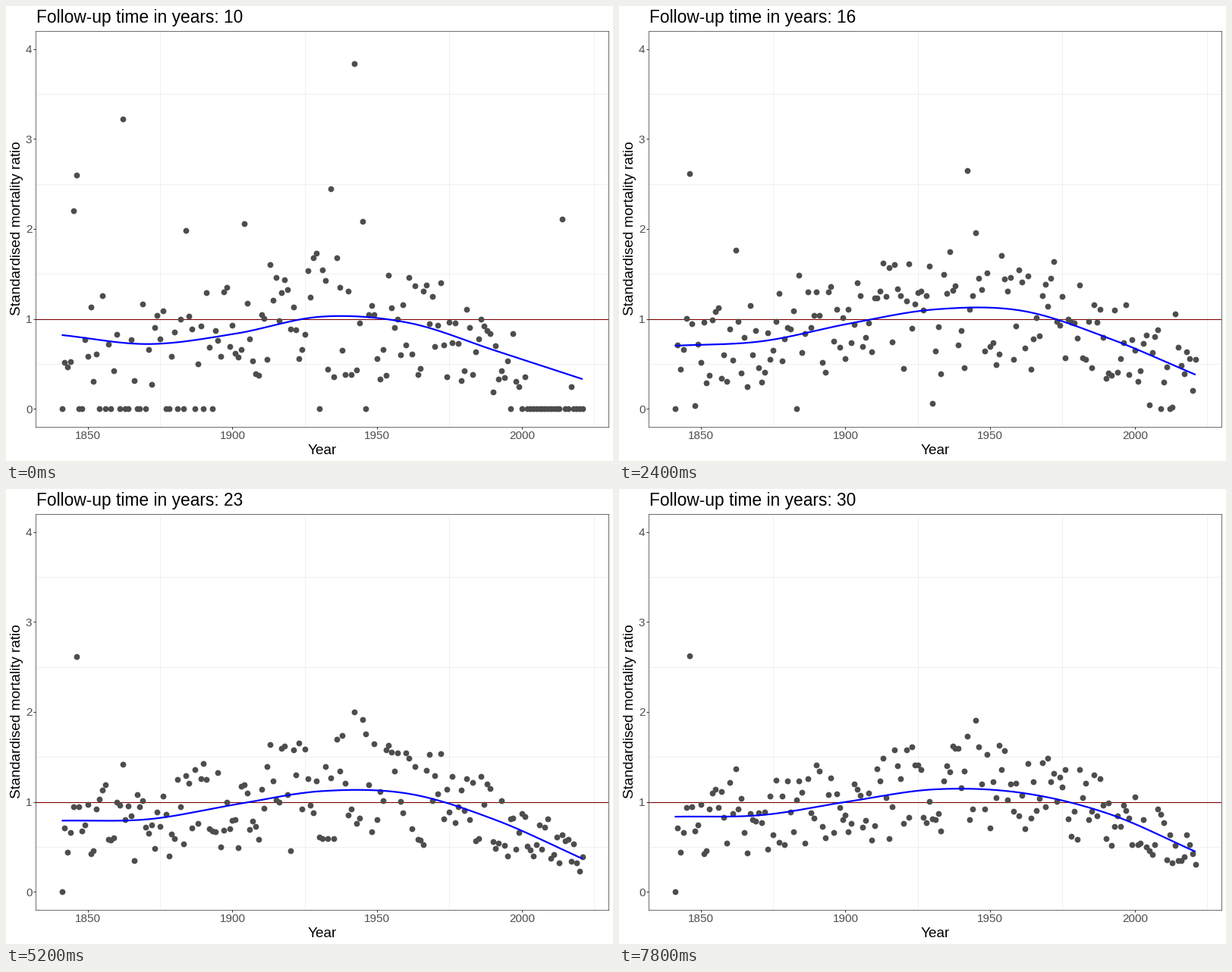
A matplotlib script for the animation above (8000 ms loop, 800 px wide and 600 px high).

```python
import numpy as np
import matplotlib.pyplot as plt
from matplotlib.animation import FuncAnimation

W, H, DPI = 800, 600, 100
PX = 72 / DPI                      # points per pixel
FRAMES, STEP = 40, 200
LEFT, RIGHT, TOP, BOTTOM = 39.2, 794.2, 32.9, 554.9
X0, X1, Y0, Y1 = 1832, 2030, -0.2, 4.2
GREY, DARK, PALE = "#4d4d4d", "#333333", "#ebebeb"

plt.rcParams["font.family"] = "Liberation Sans"

years = np.arange(1841, 2022)
follow = np.arange(10, 31)         # follow-up time, whole years

# Trend height every 30 years from 1841, keyed by follow-up time
TREND = {
    10: [.82, .72, .835, 1.025, .955, .645, .33],
    14: [.69, .715, .905, 1.115, 1.04, .75, .44],
    16: [.70, .75, .945, 1.105, 1.09, .785, .38],
    20: [.77, .785, .955, 1.11, 1.085, .765, .33],
    30: [.837, .855, 1.005, 1.14, 1.10, .87, .45],
}

# Points that stand out: year, first height, final height, years to settle
PEAKS = [
    (1845, 2.20, .94, 2), (1846, 2.60, 2.62, 5), (1862, 3.22, 1.35, 4),
    (1884, 1.98, 1.20, 6), (1904, 2.06, 1.12, 5), (1934, 2.45, 1.22, 4),
    (1942, 3.84, 1.50, 8.5), (1945, 2.08, 1.90, 5), (2014, 2.11, .45, 6),
]


def time_at(i):
    return 10 + 50 * i / 99


def smooth(keys):
    """Catmull-Rom curve through evenly spaced keys, sampled at each year."""
    p = np.array([2 * keys[0] - keys[1], *keys, 2 * keys[-1] - keys[-2]])
    u = (years - 1841) / 30
    k = np.minimum(u.astype(int), len(keys) - 2)
    f = u - k
    a, b, c, d = p[k], p[k + 1], p[k + 2], p[k + 3]
    return b + f / 2 * (c - a + f * (2 * a - 5 * b + 4 * c - d
                                     + f * (3 * (b - c) + d - a)))


def mix(rows, times, t):
    """Linear blend of the two rows that lie either side of time t."""
    k = int(np.clip(np.searchsorted(times, t, side="right") - 1, 0, len(times) - 2))
    f = (t - times[k]) / (times[k + 1] - times[k])
    return rows[k] * (1 - f) + rows[k + 1] * f


trend_times = list(TREND)
curves = [smooth(keys) for keys in TREND.values()]


def build_ratios():
    """Ratio for each follow-up time (rows) and calendar year (columns)."""
    rng = np.random.default_rng(1841)
    n, rho = len(years), 0.93
    z = rng.standard_normal(n)

    # Some years have no deaths at first, mostly early and late ones
    chance = np.interp(years, [1841, 1897, 1905, 1980, 2000, 2004],
                       [.3, .3, .02, .02, .2, .8])
    release = np.where(rng.random(n) < chance, 10.1 + rng.exponential(4.5, n), 0)

    out = []
    for t in follow:
        spread = np.interp(t, [10, 30], [.76, .5])
        ratio = mix(curves, trend_times, t) * (1 + spread * np.tanh(.75 * z))
        out.append(np.where(t < release, 0, ratio))
        z = rho * z + np.sqrt(1 - rho ** 2) * rng.standard_normal(n)
    out = np.array(out)

    for j in range(15):            # the earliest groups settle for good
        out[j + 1:, j] = out[j + 1, j]
    for year, start, end, settle in PEAKS:
        out[:, year - 1841] = end + (start - end) * np.exp((10 - follow) / settle)
    return out


ratios = build_ratios()

fig = plt.figure(figsize=(W / DPI, H / DPI), dpi=DPI, facecolor="white")
ax = fig.add_axes([LEFT / W, 1 - BOTTOM / H, (RIGHT - LEFT) / W, (BOTTOM - TOP) / H])
ax.set(xlim=(X0, X1), ylim=(Y0, Y1))
ax.set_xticks(range(1850, 2001, 50))
ax.set_yticks(range(5))
ax.tick_params(length=2.75 * PX, width=1.07 * PX, color=DARK,
               labelbottom=False, labelleft=False)
for side in ax.spines.values():
    side.set(color=DARK, linewidth=0.7 * PX)


def label(x, y, text, size, color="black", **kw):
    return fig.text(x / W, 1 - y / H, text, fontsize=size * PX, color=color,
                    va="baseline", **kw)


for x in range(1875, 2026, 50):
    ax.axvline(x, color=PALE, lw=0.7 * PX, zorder=0)
for y in np.arange(.5, 4):
    ax.axhline(y, color=PALE, lw=0.7 * PX, zorder=0)
ax.axhline(1, color="#800000", lw=1.1 * PX, zorder=1)

for year in range(1850, 2001, 50):
    x = LEFT + (year - X0) / (X1 - X0) * (RIGHT - LEFT)
    label(x, 571.3, str(year), 15.2, GREY, ha="center")
for v in range(5):
    y = BOTTOM - (v - Y0) / (Y1 - Y0) * (BOTTOM - TOP)
    label(34.4, y + 5.5, str(v), 15.2, GREY, ha="right")
label(417, 591, "Year", 19, ha="center")
label(19.3, 293.5, "Standardised mortality ratio", 19, ha="center",
      rotation=90, rotation_mode="anchor")
title = label(39.5, 22, "", 22.8, ha="left")

dots = ax.scatter(years, ratios[0], s=(7.8 * PX) ** 2, color=GREY,
                  linewidths=0, zorder=2)
line, = ax.plot(years, curves[0], color="blue", lw=2.2 * PX, zorder=3,
                solid_capstyle="butt", solid_joinstyle="round")


def draw(i):
    t = time_at(i)
    dots.set_offsets(np.column_stack([years, mix(ratios, follow, t)]))
    line.set_ydata(mix(curves, trend_times, t))
    title.set_text(f"Follow-up time in years: {round(t)}")
    return dots, line, title


anim = FuncAnimation(fig, draw, frames=FRAMES, interval=STEP, repeat=True,
                     repeat_delay=0, blit=False)
plt.show()
```
